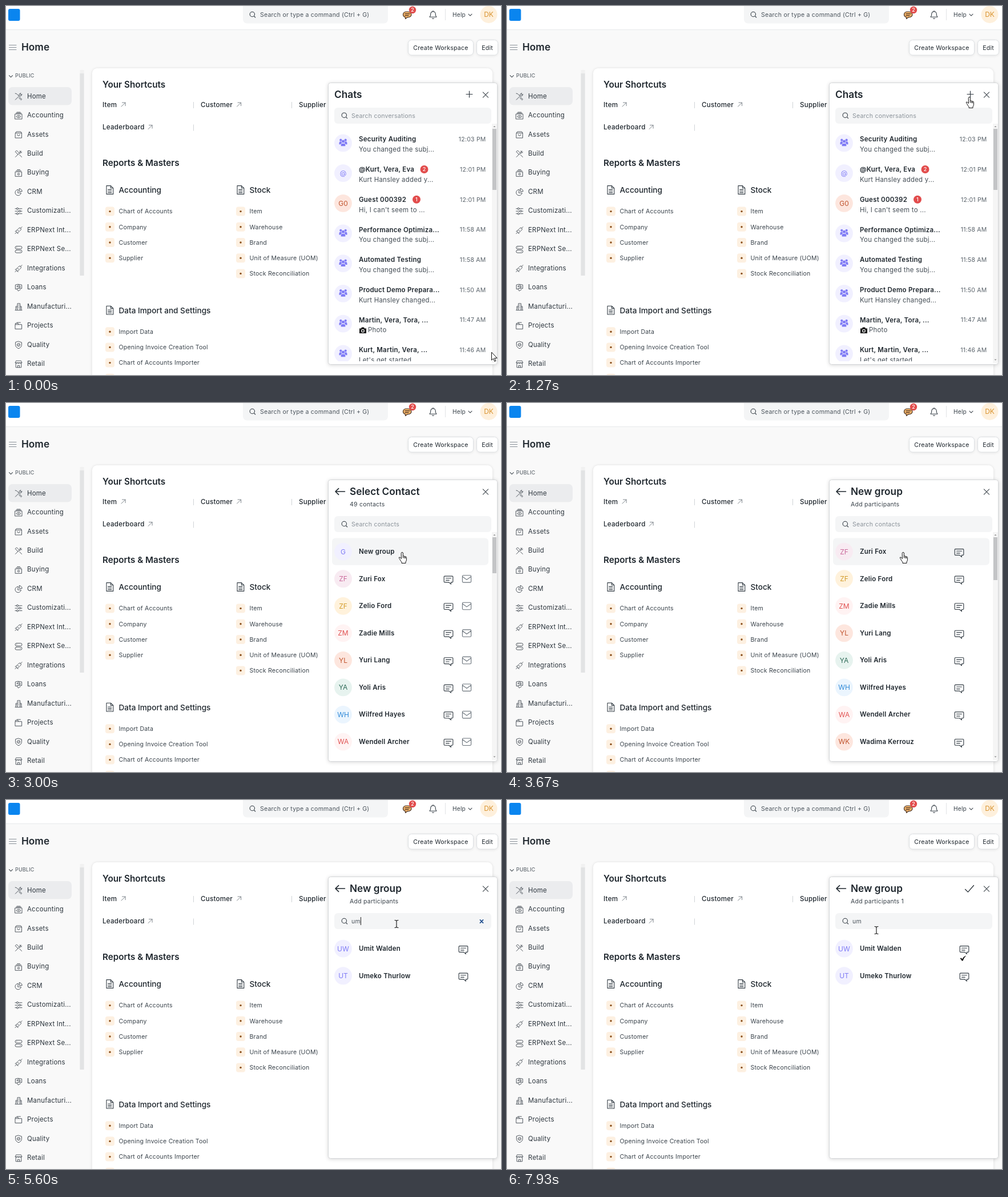
Animation, 867 px wide and 646 px high, one loop 8 s. Source, as an HTML page:

```html
<!DOCTYPE html>
<html lang="en">
<head>
<meta charset="utf-8">
<title>Workspace chat</title>
<style>
html, body { margin: 0; width: 100%; height: 100%; overflow: hidden; background: #f9f9f9; }
svg { display: block; position: absolute; left: 0; top: 0; }
text { font-family: Inter, Roboto, sans-serif; font-optical-sizing: none; letter-spacing: .02em; white-space: pre; }
text.flat { letter-spacing: 0; }
.card { filter: drop-shadow(0 1px 2px rgba(0, 0, 0, .08)); }
.pop { filter: drop-shadow(0 1px 3px rgba(0, 0, 0, .16)); }
</style>
</head>
<body>
<svg id="stage" width="867" height="646" viewBox="0 0 867 646">
  <defs><clipPath id="list"><rect x="565" y="207" width="295" height="415"/></clipPath></defs>
  <g id="page"></g>
  <g id="panel"></g>
  <g id="cursor"></g>
</svg>
<script>
const INK = '#1f272e', BODY = '#3a434b', LINE = '#e2e4e6', SOFT = '#f4f5f6';
const SM = 10.56, MD = 11.45, TITLE = 17.25, MID = 450;
const $ = id => document.getElementById(id);

// y is the middle of the capitals; baselines sit on whole pixels
const text = (x, y, s, size = SM, weight = 400, fill = BODY, anchor = 'start') =>
  `<text x="${x}" y="${Math.round(y + size * .364)}" font-size="${size}" font-weight="${weight}" fill="${fill}"
    text-anchor="${anchor}"${size > 11.6 ? ' class="flat"' : ''}>${s}</text>`;
const rect = (x, y, w, h, fill, r = 0, more = '') =>
  `<rect x="${x}" y="${y}" width="${w}" height="${h}" rx="${r}" fill="${fill}" ${more}/>`;
const dot = (x, y, r, fill) => `<circle cx="${x}" cy="${y}" r="${r}" fill="${fill}"/>`;
const path = (x, y, d, stroke = '#434b52', w = 1, fill = 'none') =>
  `<path transform="translate(${x} ${y})" d="${d}" fill="${fill}" stroke="${stroke}" stroke-width="${w}"
    stroke-linecap="round" stroke-linejoin="round"/>`;

const lens = (x, y) => path(x, y, 'M4 -.5a4.2 4.2 0 1 1-8.4 0a4.2 4.2 0 1 1 8.4 0M2.8 2.6L5.2 5', '#333c44', 1.1);
const badge = (x, y, n, r = 7) => dot(x, y, r, '#e24c4c') + text(x, y, n, 9, 500, '#fff', 'middle');
const chevron = (x, y) => path(x, y, 'M-3 -1.4L0 1.6L3 -1.4', '#434b52', 1.1);

/* ---------- page ---------- */
const PLUG = 'M1 13l2.4-2.4M5 6l3.2 3.2-1.6 1.6a2.2 2.2 0 0 1-3.2-3.2zM6 4.8l1.4-1.4a2.3 2.3 0 0 1 3.3 3.3L9.2 8.1M10.6 3.4L13 1M1 9l1.2-1M6 13l-.8-1.4';
const MENU = [
  ['Home', 'M1.4 12.6L8 6M12.8 3a3.2 3.2 0 0 1-4.4 3.2A3.2 3.2 0 0 1 11 1.2L9.8 3.2l1 1zM1.2 1.6l2.2.4L7 5.6M8.6 8.2l4.2 3.6-1.4 1.4-3.8-3.8'],
  ['Accounting', 'M1 4.2h12V13H1zM2.4 2.6h9.2M4 1h6M3 8.6q4-4.4 8 0q-4 4.4-8 0M6.2 8.6h1.6'],
  ['Assets', 'M1.5 4l1.6-2.4h7.8L12.5 4v8.6h-11zM1.5 4h11M4.6 6.4a2.4 2.4 0 0 0 4.8 0'],
  ['Build', 'M1.5 12.5L8 6M6 8L1.2 3.4L3.6 1L8 5.4M8.6 8.6l4 4M9 2l3.2 3.2M8 6l3-4.2M12.6 3.4L9 6.6'],
  ['Buying', 'M1.5 5h11v8h-11zM2.8 3.2h8.4M4.6 1.2h4.8M5.4 9a1.6 1.6 0 1 0 3.2 0a1.6 1.6 0 1 0-3.2 0'],
  ['CRM', 'M6 2.6A5.2 5.2 0 1 0 11.4 8.4H6zM8.4 1v4.8h4.8A4.8 4.8 0 0 0 8.4 1z'],
  ['Customizati...', 'M1 2.6h2.4M6.6 2.6H13M1 7h6.4M10.6 7H13M1 11.4h2.4M6.6 11.4H13M3.4 2.6a1.6 1.6 0 1 0 3.2 0a1.6 1.6 0 1 0-3.2 0M7.4 7a1.6 1.6 0 1 0 3.2 0a1.6 1.6 0 1 0-3.2 0M3.4 11.4a1.6 1.6 0 1 0 3.2 0a1.6 1.6 0 1 0-3.2 0'],
  ['ERPNext Int...', PLUG],
  ['ERPNext Se...', 'M3.4 1.4h7.2a2.4 2.4 0 0 1 0 4.8H3.4a2.4 2.4 0 0 1 0-4.8zM3.4 8.2h7.2a2.4 2.4 0 0 1 0 4.8H3.4a2.4 2.4 0 0 1 0-4.8zM3.6 3.8h.6M9.8 10.6h.6'],
  ['Integrations', PLUG],
  ['Loans', 'M4 9.6H1.4V2.2L6 1.2l6.6 1v6.4H10M4 6a3 3 0 1 1 3.6 2.8M5 5.4h4M4.4 9l4-1.6M4.4 9l2 4 4-2.6'],
  ['Manufacturi...', 'M1 13h12M2.2 13V6.4H5V13M5 6.4V1.4h4.6V13M9.6 6.4h2.4V13M7 4h.6M7 6.6h.6M7 9.2h.6M3.4 9h.3M10.8 9h.3'],
  ['Projects', 'M1.4 4.8h11.2V12.6H1.4zM1.4 4.8V2.6H6l1 2.2M4 1.2h6.4'],
  ['Quality', 'M7 .8l5.4 1.8v4.2q0 4.4-5.4 6.6q-5.4-2.2-5.4-6.6V2.6zM4.4 6.8a2.6 2.6 0 1 0 5.2 0a2.6 2.6 0 1 0-5.2 0M6 6.8l.8.8 1.4-1.6'],
  ['Retail', 'M1.2 4.6L2.6 1.4h8.8l1.4 3.2zM1.2 4.6q1.5 2.6 3.8 0q2 2.6 4 0q2.3 2.6 3.8 0M2.2 6.4V13h9.6V6.4M5.4 13V9.4h3.2V13']
];
const FILE = 'M2 .6h7.4l4.4 4.2v10.6H2zM9.4.6v4.2h4.4M4.8 7.4h6M4.8 10h6M4.8 12.6h6';

const shortcut = (x, y, s, arrow) =>
  text(x, y, s, 11.6, MID, INK) + (arrow ? path(arrow, y - 4, 'M.5 7.5L7.5 .8M2 .6h5.6v5.6', '#737b82', .9) : '');
const section = (x, y, title, links) =>
  path(x, y - 8, FILE, '#333c44', 1.1) + text(x + 23.5, y, title, 13.6, MID, INK) +
  links.map((s, i) => {
    const ly = y + 37.6 + 27.2 * i;
    return rect(x, ly - 8, 16, 16, '#fdf0e1', 4) + dot(x + 8, ly, 1.7, '#8a4d18') + text(x + 23.5, ly, s);
  }).join('');
const button = (x, w, s) => rect(x, 59.5, w, 26.5, '#fff', 6, 'stroke="#dcdfe2" class="card"') +
  text(x + w / 2, 73, s, 10.6, 400, INK, 'middle');

function drawPage() {
  const head = rect(0, 0, 867, 41, '#fff') + rect(0, 41, 867, 1, '#e8e9ea') +
    rect(4, 5, 20.5, 21, '#0a85ef', 3) +
    rect(415, -8, 254, 38.5, SOFT, 7) + lens(431.5, 15) +
    text(445, 15, 'Search or type a command (Ctrl + G)', SM, 400, '#4c555d') +
    path(703, 16, 'M-7.5 -1q0-5 7-5t7.5 5q0 4.8-7 4.8l-3.5 2.6-.3-3q-3.7-1-3.7-4.4z', '#463022', 1.2, '#f3b46a') +
    path(703, 16, 'M-4 -2.4h8M-4 .6h6', '#463022', 1.3) + badge(712, 7, 2, 6.2) +
    path(748, 15, 'M-6 4.2q1.8-1.6 1.8-5.4a4.2 4.2 0 0 1 8.4 0q0 3.8 1.8 5.4zM-1.6 6.6q1.6 1.2 3.2 0M0-6.6v1', '#333c44', 1.1) +
    rect(769, 5, 1, 20, LINE) + text(782, 15, 'Help', 10.2) + chevron(813, 15.5) +
    dot(845.5, 15, 15, '#fef0dc') + text(845.5, 15, 'DK', 12, 400, '#d9932f', 'middle') +
    path(5.5, 72.5, 'M0 -4h12.5M0 0h12.5M0 4h12.5', '#8a9299', 1) +
    text(27, 72, 'Home', TITLE, 600, INK) + button(704.5, 114, 'Create Workspace') + button(824.5, 37, 'Edit');

  const side = chevron(8.5, 123) + text(16, 122, 'PUBLIC', 9, 400, '#4c555d') +
    rect(129.5, 112, 7, 360, '#f1f1f1') + rect(129.5, 118, 7, 354, '#e2e3e4') + rect(4, 142, 111, 31.5, '#ebecee', 7) +
    MENU.map(([s, d], i) => {
      const y = 157.5 + 33.45 * i;
      return path(15, y - 6, d, '#4a5259', .95) + text(37, y, s, MD, 400, '#2c353d');
    }).join('');

  const main = rect(150.5, 108.5, 702, 560, '#fff', 9, 'stroke="#ececec" class="card"') +
    text(169, 137, 'Your Shortcuts', 15.3, 600, INK) +
    shortcut(169, 172.5, 'Item', 201.5) + shortcut(341, 172.5, 'Customer', 404) + shortcut(513, 172.5, 'Supplier') +
    shortcut(169, 212, 'Leaderboard', 248.5) +
    [[328, 168], [500, 168], [328, 207.5]].map(([x, y]) => rect(x, y, 1, 11, '#cfd3d6')).join('') +
    text(169, 274.5, 'Reports &amp; Masters', 15.2, 600, INK) +
    section(174, 322, 'Accounting', ['Chart of Accounts', 'Company', 'Customer', 'Supplier']) +
    section(403, 322, 'Stock', ['Item', 'Warehouse', 'Brand', 'Unit of Measure (UOM)', 'Stock Reconciliation']) +
    section(174, 532.6, 'Data Import and Settings',
      ['Import Data', 'Opening Invoice Creation Tool', 'Chart of Accounts Importer', '']);
  $('page').innerHTML = head + main + side;
}

/* ---------- chat panel ---------- */
const VIOLET = ['#f1f0ff', '#7f7bf5'], RUST = ['#fde6de', '#c0552f'], RED = ['#fff3f3', '#e05252'];
const CHATS = [
  ['Security Auditing', 'You changed the subj...', '12:03 PM'],
  ['@Kurt, Vera, Eva', 'Kurt Hansley added y...', '12:01 PM', '@', VIOLET, 732.5, 2],
  ['Guest 000392', "Hi, I can't seem to ...", '12:01 PM', 'G0', RUST, 719, 1],
  ['Performance Optimiza...', 'You changed the subj...', '11:58 AM'],
  ['Automated Testing', 'You changed the subj...', '11:58 AM'],
  ['Product Demo Prepara...', 'Kurt Hansley changed...', '11:50 AM'],
  ['Martin, Vera, Tora, ...', 'Photo', '11:47 AM'],
  ['Kurt, Martin, Vera, ...', "Let's get started", '11:46 AM']
];
const PEOPLE = [
  ['Zuri Fox', ['#f8ebf2', '#cb6a9c']], ['Zelio Ford', ['#fff2dc', '#d39c2c']], ['Zadie Mills', RED],
  ['Yuri Lang', RUST], ['Yoli Aris', ['#e7f3ef', '#2f6b58']], ['Wilfred Hayes', ['#ebf5fe', '#318ad8']],
  ['Wendell Archer', RED], ['Wadima Kerrouz', RUST]
];
const FOUND = [['Umit Walden', VIOLET], ['Umeko Thurlow', VIOLET]];
const CHAT_TOP = 216.4, CHAT_H = 52.7, ROW_TOP = 236.4, ROW_H = 47.55;

const initials = s => s.split(' ').map(w => w[0]).join('');
const crowd = (x, y, fill) => dot(x - 4.2, y - 4.6, 2.1, fill) + dot(x + 4.2, y - 4.6, 2.1, fill) + dot(x, y - 2.2, 2.5, fill) +
  path(x, y, 'M-7 3v-2.6q0-2.4 2.4-2.4h1.4q.2 1.8 1.2 2.6q-2.2.6-2.4 2.4zM7 3v-2.6q0-2.4-2.4-2.4h-1.4q-.2 1.8-1.2 2.6q2.2.6 2.4 2.4zM-3.8 6v-2q0-2.6 2.6-2.6h2.4q2.6 0 2.6 2.6v2z', 'none', 0, fill);
const avatar = (y, [bg, fg], s) => dot(590.5, y, 15.4, bg) +
  (s ? text(590.5, y, s, 12, 400, fg, 'middle') : crowd(590.5, y - .6, fg));
const bubble = (x, y) => path(x, y, 'M-6.6 -6h13.2q1.2 0 1.2 1.2v8.4q0 1.2-1.2 1.2H4.4V8L.8 4.8h-7.4q-1.2 0-1.2-1.2v-8.4q0-1.2 1.2-1.2zM-4.4 -2.4h8.8M-4.4 1.2h5.6', '#333c44', 1.15);
const mail = (x, y) => path(x, y, 'M-6 -6.2H6q1.6 0 1.6 1.6v9.2q0 1.6-1.6 1.6H-6q-1.6 0-1.6-1.6v-9.2q0-1.6 1.6-1.6zM-7.4 -4L0 1.4L7.4 -4', '#69727a', 1.1);
const closer = () => path(840, 155.5, 'M-4.6 -4.6L4.6 4.6M-4.6 4.6L4.6 -4.6', '#434b52', 1.1);
const search = (y, s, typed) => rect(575, Math.round(y - 14), 275, 28, SOFT, 6) + lens(592.5, y) +
  text(605, y, s, SM, 400, typed ? '#4c555d' : '#8b939a');
const bar = (top, thumb) => rect(851, top, 9, 625 - top, '#f5f5f5') + rect(852, top + 9, 7, thumb, '#c3c4c6') +
  path(855.5, top + 5, 'M-2 1L0 -1L2 1z', 'none', 0, '#8a8a8a') + path(855.5, 619.5, 'M-2 -1L0 1L2 -1z', 'none', 0, '#8a8a8a');
const glow = (y, h, on) => on ? rect(571, y, 274, h, SOFT, 6) : '';

function chatList(hover) {
  const rows = CHATS.map(([name, msg, time, mark, tone = VIOLET, bx, n], i) => {
    const y = 233.3 + CHAT_H * i, photo = msg === 'Photo';
    return glow(y - 17, 52.3, hover === i) + avatar(y + 6.6, tone, mark) +
      text(618, y, name, 11.5, 600, INK) + (n ? badge(bx, y, n) : '') +
      (photo ? path(619, y + 13, 'M0 2h3l1-2h4l1 2h3v8.5H0z', 'none', 0, '#111') + dot(625, y + 19.2, 2.9, '#fff') + dot(625, y + 19.2, 1.7, '#111') : '') +
      text(photo ? 634 : 618, y + 17.8, msg, MD, 400, '#454e56') +
      text(840.5, y, time, 10.5, 400, '#59626a', 'end');
  }).join('');
  return text(575, 155, 'Chats', TITLE, 600, INK) + path(811.5, 154.5, 'M-5.5 0h11M0 -5.5v11', '#333c44', 1.2) +
    search(191.7, 'Search conversations') + `<g clip-path="url(#list)">${rows}</g>` + bar(206, 107);
}

const people = (list, hover, first, icons) => list.map(([name, tone], k) => {
  const i = k + first, y = 260 + ROW_H * i;
  return glow(y - 23.4, 47.2, hover === i) + avatar(y + .2, tone, initials(name)) +
    text(618, y, name, 11.5, 600, INK) + icons(y);
}).join('');

const subHead = (title, note) => path(577, 155, 'M0 0h16.5M5.6 -5.4L0 0L5.6 5.4', INK, 1.6) +
  text(602, 155, title, TITLE, 600, INK) + text(602, 177.5, note);

function contacts(hover) {
  return subHead('Select Contact', '49 contacts') + search(212, 'Search contacts') +
    glow(236.6, 47.2, hover === 0) + avatar(260.2, VIOLET, 'G') + text(618, 260, 'New group', 11.5, 600, INK) +
    people(PEOPLE.slice(0, 7), hover, 1, y => bubble(775, y + 1.6) + mail(807, y + .4)) + bar(226, 63);
}

function group(s) {
  const caretX = [606, 612, 621][s.query.length];
  return subHead('New group', 'Add participants' + (s.picked ? ' 1' : '')) +
    search(212, s.query || 'Search contacts', s.query) +
    (s.caret ? rect(caretX, 205, 1, 14, '#222') : '') +
    (s.clear ? path(833, 212.5, 'M-2.6 -2.6L2.6 2.6M-2.6 2.6L2.6 -2.6', '#1f4f8f', 1.7) : '') +
    (s.mode === 'group' ? people(PEOPLE, s.hover, 0, y => bubble(792, y + 1.6)) + bar(226, 75) : '') +
    (s.mode === 'found' ? people(FOUND, s.hover, 0, y => bubble(801, y + 1.6)) : '') +
    (s.picked ? path(810, 155.5, 'M-7.5 .8L-2.6 5.6L7.5 -6', INK, 1.2) +
      path(798.5, 277, 'M-5 .6l2-1.4 1.8 2.4q2-4.4 6-6.2l.4.6q-3.6 3.4-5.2 8.6h-1.8q-1-2.4-3.2-4z', 'none', 0, '#111') : '');
}

function panel(s) {
  const inside = s.mode === 'chats' ? chatList(s.hover)
    : s.mode === 'load' ? subHead('Select Contact', '') + search(191.7, 'Search contacts')
    : s.mode === 'contacts' ? contacts(s.hover) : group(s);
  return rect(564.5, 134.5, 296, 493, '#fff', 4, 'stroke="#d5d7d9" class="pop"') + inside + closer();
}

/* ---------- motion ---------- */
const SHAPES = {
  arrow: path(0, 0, 'M.5 .5V14L3.6 11.2L5.8 16.2L7.8 15.3L5.7 10.4H9.8z', '#111', 1, '#fff'),
  hand: path(0, 0, 'M-1.8 2q0-1.6 1.6-1.6T1.4 2v4.8q1.4-.8 2 .6q1.4-.6 2 .7q2-.4 2 1.5v4.2q0 1.6-1.4 3.2v2.4h-7v-2q-2-2-3.2-4.8q-2-2.6-1.4-3.4q1.4-1 3.8 2zM1.4 7v3M3.6 7.6v3M5.5 8.4v2.4', '#111', 1, '#fff'),
  beam: path(0, 0, 'M-3 -6.5q2 0 3 1q1-1 3-1M0 -5.5v11M-3 6.5q2 0 3-1q1 1 3 1', '#111', 1.1)
};
const flat = p => p, out = p => 1 - (1 - p) ** 2, soft = p => p * p * (3 - 2 * p);
// time, x, y, easing towards this point
const MOVES = [
  [200, 850, 606], [600, 825, 305, flat], [1066, 815, 172, out], [1400, 809, 157, out],
  [2466, 809, 157, flat], [3000, 694, 261, soft], [3666, 694, 261, flat], [4133, 684, 217, soft],
  [6733, 684, 217, flat], [7000, 688, 251, soft], [7400, 688, 251, flat], [7933, 647, 228, soft]
];
const TICK = 200 / 3;

function pointAt(t) {
  const i = MOVES.findIndex(m => m[0] >= t);
  if (i === 0) return MOVES[0].slice(1, 3);
  if (i < 0) return MOVES[MOVES.length - 1].slice(1, 3);
  const a = MOVES[i - 1], b = MOVES[i], p = b[3]((t - a[0]) / (b[0] - a[0]));
  return [a[1] + (b[1] - a[1]) * p, a[2] + (b[2] - a[2]) * p];
}

const modeAt = t => t < 1800 ? 'chats' : t < 2270 ? 'load' : t < 3200 ? 'contacts'
  : t < 3670 ? 'empty' : t < 5600 ? 'group' : 'found';

function hoverAt(mode, x, y) {
  if (x < 571 || x > 845 || mode === 'load' || mode === 'empty') return -1;
  const [top, h, n] = mode === 'chats' ? [CHAT_TOP, CHAT_H, 8] : [ROW_TOP, ROW_H, mode === 'found' ? 2 : 8];
  const i = Math.floor((y - top) / h);
  return i >= 0 && i < n ? i : -1;
}

function shapeAt(t, mode, hover, x, y) {
  if (t < 1870 && x < 824 && y < 176) return 'hand';
  if (hover >= 0) return 'hand';
  const top = mode === 'chats' ? 178 : mode === 'load' ? 999 : 198;
  return x < 850 && y > top && y < top + 31 ? 'beam' : 'arrow';
}

function caretAt(t) {
  if (t < 4200 || t >= 7270) return false;
  const since = t < 5070 ? 4200 : t < 5270 ? 5070 : 5270;
  return Math.floor((t - since) / 530) % 2 === 0;
}

let lastPanel = '', lastShape = '';
function show(t) {
  const [x, y] = pointAt(Math.floor((t + 5) / TICK) * TICK);
  const mode = modeAt(t), hover = hoverAt(mode, x, y);
  const state = {
    mode, hover, query: t < 5070 ? '' : t < 5270 ? 'u' : 'um',
    caret: caretAt(t), clear: t >= 5070 && t < 7270, picked: t >= 7330
  };
  const key = JSON.stringify(state), shape = shapeAt(t, mode, hover, x, y);
  if (key !== lastPanel) $('panel').innerHTML = panel(state);
  if (shape !== lastShape) $('cursor').innerHTML = SHAPES[shape];
  lastPanel = key;
  lastShape = shape;
  $('cursor').setAttribute('transform', `translate(${Math.round(x)} ${Math.round(y)})`);
}

drawPage();
const start = performance.now();
function loop() {
  show((performance.now() - start) % 8000);
  requestAnimationFrame(loop);
}
loop();
</script>
</body>
</html>
```
